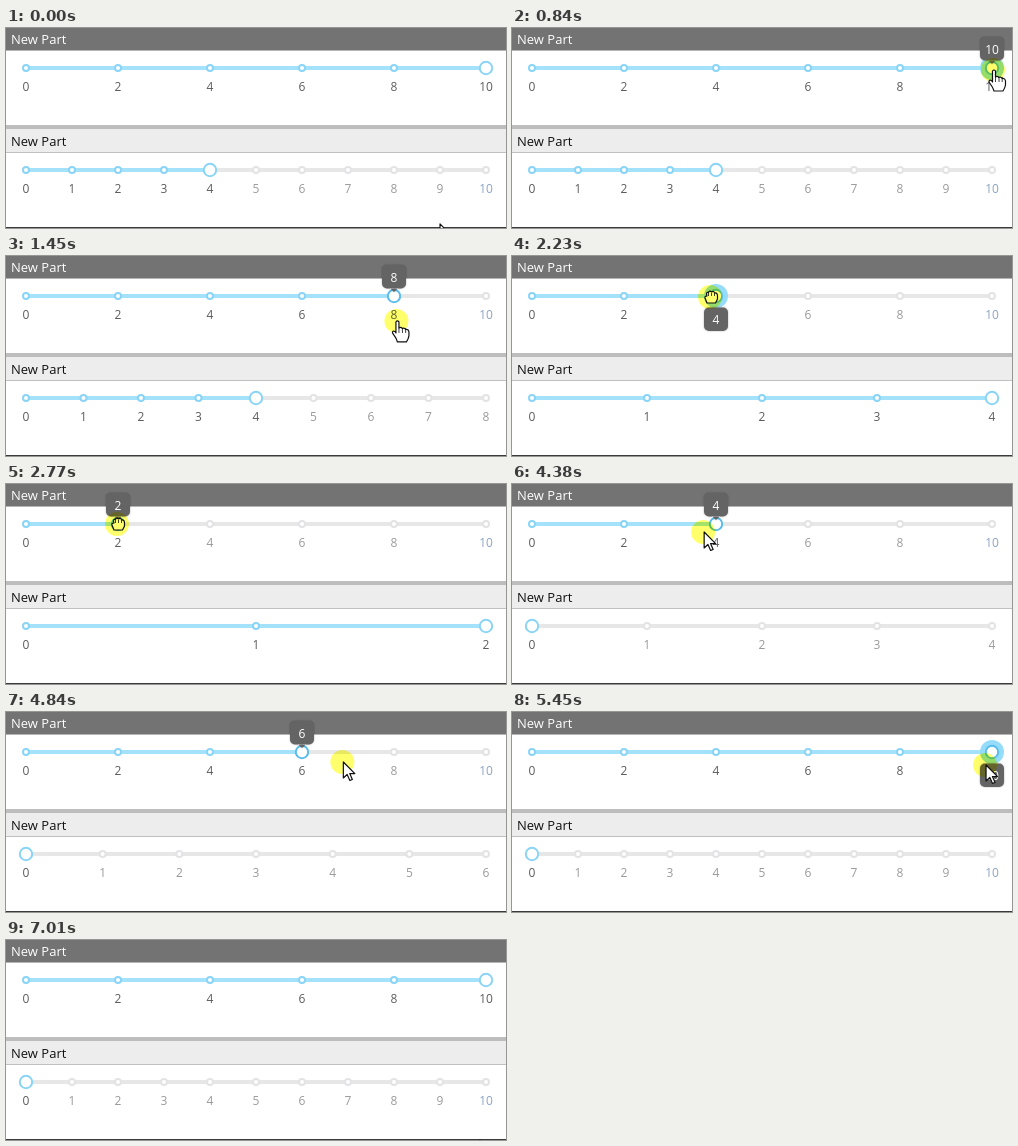
Recreate the animation shown at these times as an HTML page with a canvas. Size 500 px wide and 200 px high, loop 7.16 s.

```html
<!DOCTYPE html>
<html lang="en">
<head>
<meta charset="utf-8">
<title>Linked sliders</title>
<style>
  html, body { margin: 0; width: 100%; height: 100%; overflow: hidden; background: #fff; }
  canvas { display: block; width: 500px; height: 200px; }
</style>
</head>
<body>
<canvas id="stage" width="500" height="200"></canvas>
<script>
const ctx = document.getElementById('stage').getContext('2d');
const LOOP = 7160, LEFT = 20, WIDTH = 460;
const FONT = '"Open Sans", "Noto Sans", sans-serif';
const BLUE = '#8ad4f6', ACTIVE = '#58bdec', FILL = '#a4e2fb', GREY = '#e7e7e8';

// Pointer path: time, x, y
const path = [
  [0, 434, 196], [70, 436, 190], [620, 482, 42], [920, 482, 42],
  [1450, 392, 65], [1610, 302, 58], [1850, 302, 58], [2230, 199, 41],
  [2480, 199, 41], [2770, 112, 40], [2940, 112, 40], [3380, 22, 40],
  [3700, 22, 40], [4380, 192, 48], [4460, 204, 48], [5220, 470, 52],
  [5450, 474, 53], [5760, 486, 53], [6239, 486, 53],
  [6240, 486, 76], [6580, 474, 200], [LOOP, 474, 200]
];

const arrow = new Path2D('M0 0V16L3.8 12.5L6.5 18.5L9 17.4L6.4 11.6H11.5Z');
const hand = new Path2D('M-1.5 1Q0-1 1.5 1V7Q3 5.5 5 7.5Q7 6.5 8.2 8.5Q11 8 11.5 11V15Q11 18 9 21H0Q-1-18 0 18L-5 12Q-5 9.5-2.5 10.5L-1.5 12Z'.replace('-1-18 0 18', '-1 18-2 16.5'));
const fist = new Path2D('M-4 6L-6 1Q-6.5-1-4-1Q-5.5-5-2.5-4.5Q-1.5-7 .5-5Q3-6.5 3.5-4Q6.5-4.5 6.5-1V2L4.5 6Z');

const within = (t, from, to) => t >= from && t < to;

function pointerAt(t) {
  const i = path.findIndex(p => p[0] > t);
  const [t0, x0, y0] = path[i - 1], [t1, x1, y1] = path[i];
  const k = (t - t0) / (t1 - t0);
  return [x0 + (x1 - x0) * k, y0 + (y1 - y0) * k];
}

function rect(y, h, color, x = 0, w = 500) {
  ctx.fillStyle = color;
  ctx.fillRect(x, y, w, h);
}

function text(str, x, y, color, size = 12, align = 'center') {
  ctx.font = `${size}px ${FONT}`;
  ctx.textAlign = align;
  ctx.fillStyle = color;
  ctx.fillText(str, x, y);
}

function disc(x, y, r, fill, stroke) {
  ctx.beginPath();
  ctx.arc(x, y, r, 0, Math.PI * 2);
  ctx.fillStyle = fill;
  ctx.fill();
  if (stroke) {
    ctx.lineWidth = 2;
    ctx.strokeStyle = stroke;
    ctx.stroke();
  }
}

function slider(y, value, max, step, hover, glow) {
  const handle = LEFT + WIDTH * (max ? value / max : 1);
  rect(y - 2, 4, GREY, LEFT, WIDTH);
  rect(y - 2, 4, FILL, LEFT, handle - LEFT);
  for (let n = 0; n <= max; n += step) {
    const x = LEFT + (max ? WIDTH * n / max : 0), on = n <= value;
    disc(x, y, 3, '#fff', on ? BLUE : '#e3e3e5');
    text(n, x, y + 23, on ? '#5c5c5c' : n === 10 ? '#8ba3c4' : '#9a9a9a');
  }
  if (glow) disc(handle, y, 12, '#95dcfa');
  disc(handle, y, 6.2, '#fff', hover ? ACTIVE : BLUE);
  return handle;
}

function tooltip(x, value, below) {
  const top = below ? 51.5 : 9;
  ctx.save();
  ctx.shadowColor = 'rgba(0,0,0,.35)';
  ctx.shadowBlur = 2;
  ctx.fillStyle = '#646464';
  ctx.beginPath();
  ctx.roundRect(x - 12, top, 24, 23.5, 5);
  if (!below) {
    ctx.moveTo(x - 4, 32);
    ctx.lineTo(x, 36);
    ctx.lineTo(x + 4, 32);
  }
  ctx.fill();
  ctx.restore();
  text(value, x, top + 16.5, '#fff');
}

function highlight(x, y) {
  ctx.globalCompositeOperation = 'multiply';
  disc(x - 1, y, 12, '#ffff6c');
  ctx.globalCompositeOperation = 'source-over';
}

function cursor(x, y, t) {
  const shape = within(t, 560, 1880) ? hand : within(t, 1880, 3200) ? fist : arrow;
  ctx.save();
  ctx.translate(x, y);
  ctx.lineWidth = 1.2;
  ctx.lineJoin = 'round';
  ctx.strokeStyle = '#111';
  ctx.fillStyle = shape === fist ? '#ffff6c' : '#fff';
  ctx.fill(shape);
  ctx.stroke(shape);
  if (shape !== arrow) {
    const [from, to] = shape === hand ? [7, 12] : [-4, -1];
    ctx.lineWidth = 0.8;
    ctx.beginPath();
    for (const dx of shape === hand ? [1.5, 5, 8.2] : [-2.5, 0.5, 3.5]) {
      ctx.moveTo(dx, from);
      ctx.lineTo(dx, to);
    }
    ctx.stroke();
  }
  ctx.restore();
}

function draw(t) {
  const [px, py] = pointerAt(t);
  const dragging = within(t, 840, 5990), hover = within(t, 580, 5990);
  const below = within(t, 2068, 2540) || within(t, 5050, 5990);
  const glow = below || within(t, 840, 1200);
  const value = dragging ? 2 * Math.max(0, Math.min(5, Math.round((px - LEFT) / 92))) : 10;
  const lower = t < 3380 ? Math.min(4, value) : 0;

  rect(0, 200, '#fff');
  rect(0, 22, '#737373');
  rect(22, 1, '#b5b5b5');
  rect(97, 4, '#bdbdbd');
  rect(101, 23, '#ededed');
  rect(124, 1, '#c0c0c0');
  rect(199, 1, '#3a3a3a');
  text('New Part', 5, 16, '#fff', 13, 'left');
  text('New Part', 5, 118, '#111', 13, 'left');

  const x = slider(40, value, 10, 2, hover, glow);
  slider(142, lower, value, 1);
  if (hover) tooltip(x, value, below);
  if (dragging) highlight(px, py);
  if (!within(t, 5990, 6240)) cursor(px, py, t);
}

const start = performance.now();
function frame() {
  draw((performance.now() - start) % LOOP);
  requestAnimationFrame(frame);
}
frame();
</script>
</body>
</html>
```
